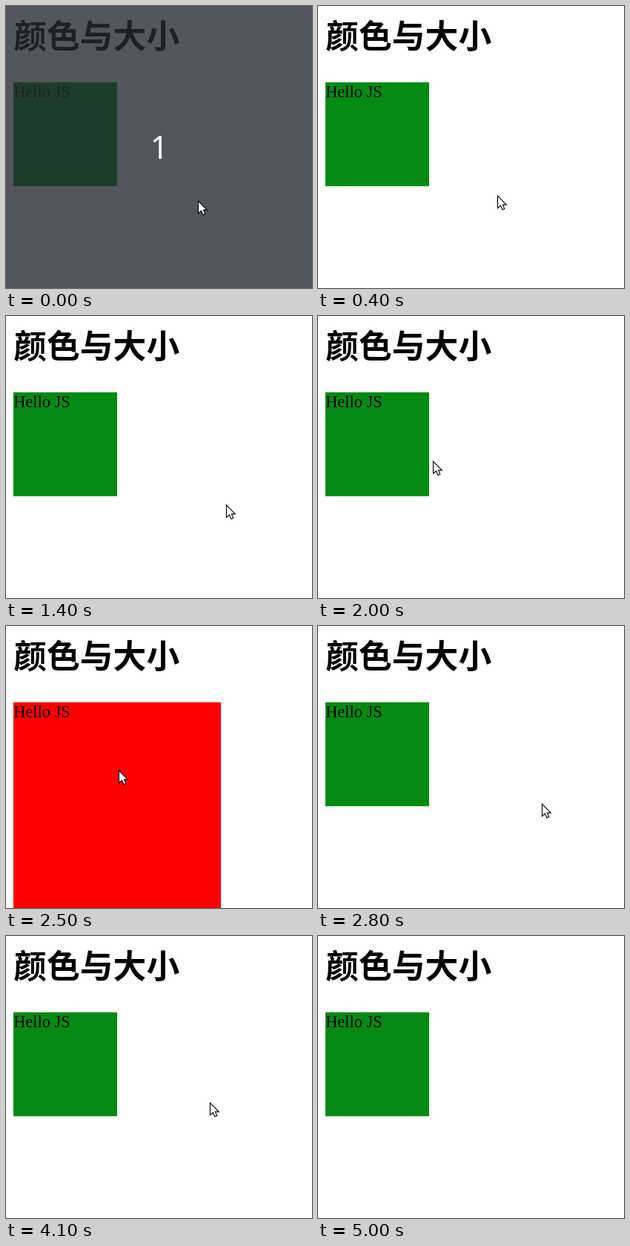
Animation, 413 px wide and 380 px high, one loop 5.4 s. Source, as an HTML page:

```html
<!DOCTYPE html>
<html lang="zh-CN">
<meta charset="utf-8">
<title>颜色与大小</title>
<style>
  html, body { margin: 0; height: 100%; overflow: hidden; background: #fff; }
  svg { display: block; }
  .title { font: bold 44.8px "Noto Sans CJK SC", "Noto Sans CJK", sans-serif; }
  .label { font: 22.4px "Liberation Serif", serif; }
  .count { font: 43px "Noto Sans", sans-serif; fill: #fff; text-anchor: middle; }
</style>
<svg width="413" height="380" viewBox="0 0 413 380">
  <text class="title" x="10.2" y="57">颜色与大小</text>
  <rect id="box" x="10" y="102.8"/>
  <text class="label" x="10.2" y="123">Hello JS</text>
  <g id="intro">
    <rect width="413" height="380" fill="#252931" opacity=".79"/>
    <text class="count" x="207" y="206">1</text>
  </g>
  <path id="cursor" d="M.5 .9V17.4L4.4 14L7 19.5L9.8 18.2L7.4 12.9H12.3Z"
    fill="#fff" stroke="#000" stroke-width="1.1"/>
</svg>
<script>
  const LOOP = 5400, STEP = 100;
  const home = [259, 262];
  // Pointer moves: start, end, target x, target y
  const moves = [
    [300, 800, 100, 197],
    [1000, 1400, 297, 254],
    [1500, 1600, 307, 252],
    [1600, 2100, 137, 188],
    [2100, 2300, 124, 186],
    [2400, 2800, 302, 239],
    [3000, 3300, 277, 233],
    [3400, 3700, 137, 188],
    [3900, 4100, 275, 224],
    [4100, 4300, 311, 222],
    [4300, 4800, 134, 0]
  ];
  const enlarged = [[700, 1400], [2100, 2800], [3700, 4100]];
  const [box, intro, cursor] = ["box", "intro", "cursor"].map(id => document.getElementById(id));
  const start = performance.now();

  const ease = u => u * u * (3 - 2 * u);

  function pointerAt(t) {
    return moves.reduce(([x, y], [from, to, tx, ty]) => {
      const k = ease(Math.min(1, Math.max(0, (t - from) / (to - from))));
      return [x + (tx - x) * k, y + (ty - y) * k];
    }, home).map(Math.round);
  }

  function draw() {
    const elapsed = (performance.now() - start) % LOOP;
    const t = Math.floor(elapsed / STEP) * STEP;
    const big = enlarged.some(([from, to]) => t >= from && t < to);
    const size = big ? 280 : 140;
    box.setAttribute("width", size);
    box.setAttribute("height", size);
    box.setAttribute("fill", big ? "#f00" : "#028a13");
    intro.style.display = t < 100 ? "" : "none";
    cursor.style.display = t < 5000 ? "" : "none";
    cursor.setAttribute("transform", `translate(${pointerAt(t)})`);
    requestAnimationFrame(draw);
  }
  draw();
</script>
</html>
```
